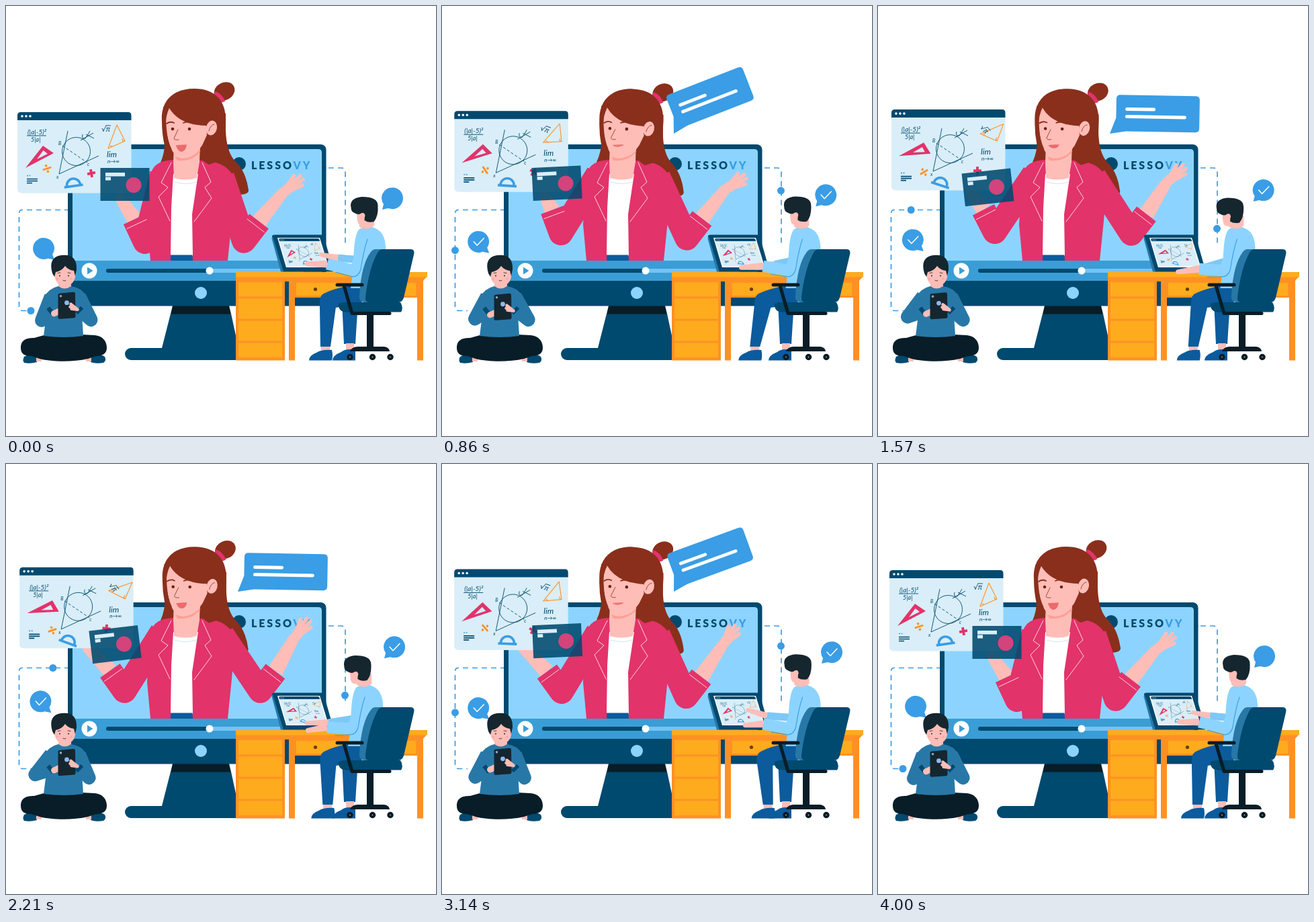
Animation, 640 px wide and 640 px high, one loop 4070 ms. Source, as an HTML page:

```html
<!DOCTYPE html>
<html lang="en">
<head>
<meta charset="utf-8">
<title>Online lesson</title>
<style>
  html, body { margin: 0; width: 100%; height: 100%; overflow: hidden; background: #fff; }
  svg { display: block; width: 100vw; height: 100vh; }
  .navy { fill: #00496f; } .ink { fill: #081d27; } .hair { fill: #8a2f1c; } .boyhair { fill: #15262f; }
  .skin { fill: #ffbdb7; } .pink { fill: #e2336a; } .sky { fill: #8cd4ff; } .blue { fill: #3a9de5; }
  .jeans { fill: #0b5b9d; } .teal { fill: #2878a7; } .amber { fill: #ffab1e; } .orange { fill: #ff9124; }
  .white { fill: #fff; }
  .line { fill: none; stroke-linecap: round; stroke-linejoin: round; }
  .flat { fill: none; stroke-linejoin: round; }
  .thin { fill: none; stroke: #00496f; stroke-width: .9; }
  text { font-family: Lato, sans-serif; fill: #00496f; }
  .note { font-style: italic; }
</style>
</head>
<body>
<svg viewBox="0 0 640 640">
  <g class="flat" stroke="#3a9de5" stroke-width="1.7" stroke-dasharray="8 6">
    <path d="M95 303.500H24Q19.500 303.500 19.500 309V448Q19.500 453.500 25 453.500H38"/>
    <path d="M480 241H499Q505 241 505 247V358"/>
  </g>
  <circle id="dotL" r="5.500" class="blue"/>
  <circle id="dotR" r="5.500" class="blue"/>

  <!-- monitor -->
  <path class="navy" d="M245 458H335L346 509V527H186A9 9 0 0 1 186 509H232Z"/>
  <path class="ink" d="M248 446H332L335 458.500H245Z"/>
  <rect class="navy" x="92" y="206" width="384.500" height="240.500" rx="8"/>
  <path class="sky" d="M99 379V218Q99 213 104 213H465Q470 213 470 218V379Z"/>
  <path fill="#3b9dd5" d="M99 379H470V409H99Z"/>
  <circle class="sky" cx="290" cy="427" r="9"/>
  <circle class="white" cx="124" cy="394" r="11.500"/>
  <path fill="#3b9dd5" d="M121 388.500V399.500L129.500 394Z"/>
  <path class="line" stroke="#74c3f5" stroke-width="6" d="M303 394H440"/>
  <path class="line" stroke="#00496f" stroke-width="6" d="M152 394H303"/>
  <circle class="white" cx="303" cy="394" r="5.500"/>
  <circle class="navy" cx="347" cy="235" r="10"/>
  <text x="365" y="242.500" font-size="16" font-weight="900" letter-spacing="2.900">LESSO<tspan fill="#3a9de5">VY</tspan></text>

  <!-- teacher -->
  <g id="hairBack"><path class="hair" d="M234 150L236 190Q238 215 230 233L250 260L330 262L348 281Q362 280 361 274Q357 246 342 232Q328 218 327 185V160Z"/></g>
  <path id="foreL" class="skin"/>
  <path id="foreR" class="skin"/>
  <g id="handR">
    <ellipse class="skin" cx="9" cy="0" rx="13" ry="8"/>
    <path class="line" stroke="#ffbdb7" stroke-width="5.500" d="M10 -4L29 -10M12 -2L36 -4M12 1L36 3M10 4L30 9"/>
  </g>
  <path id="sleeveL" class="flat" stroke="#e2336a" stroke-width="36"/>
  <path id="sleeveR" class="flat" stroke="#e2336a" stroke-width="36"/>
  <path id="cuffL" class="line" stroke="#ffd5dc"/>
  <path id="cuffR" class="line" stroke="#ffd5dc"/>
  <path class="pink" d="M250 229C226 230 217 238 214 256L210 325L215 379H330L336 320L341 258C331 238 318 231 288 230Z"/>
  <path class="white" d="M249 250H286L277 310L278 372H245L246 300Z"/>
  <path class="jeans" d="M245 370.500H277.500L278 379H245Z"/>
  <path class="skin" d="M250 205L289 200L288 232L284 256Q268 261 250 256L249 232Z"/>
  <path fill="none" stroke="#cfe3ee" d="M251 262Q268 267 283 262"/>
  <path class="line" stroke="#ffd5dc" d="M246 233L231 263L241 270L227 284L244 320M292 233L305 262L296 270L306 286L280 321"/>
  <path fill="#ff9f97" d="M252 224Q272 233 289 212V217Q277 232 255 230Z"/>
  <g id="head">
    <ellipse class="hair" cx="325" cy="127" rx="16" ry="13" transform="rotate(-28 325 127)"/>
    <path class="flat" stroke="#e2336a" stroke-width="7" d="M310 130Q319 133 323 143"/>
    <path class="skin" d="M238 150Q237 195 246 213Q254 229 268 226Q284 223 290 210L302 195V160L262 140Z"/>
    <path class="hair" d="M232 172C230 140 250 123 280 123C312 123 328 142 327 172V200Q326 215 332 226L302 236Q287 229 290 212L299 192L298 178Q258 177 243 152Q237 165 238 180Q240 200 247 214L236 208Q232 190 232 172Z"/>
    <ellipse class="skin" cx="306" cy="181.500" rx="8" ry="11" transform="rotate(12 306 181)"/>
    <path class="line" stroke="#8a2f1c" stroke-width=".8" d="M302 186Q304 177 310 176M256 184L250 197Q251 200 257 199"/>
    <path class="line" stroke="#8a2f1c" stroke-width="1.800" d="M239 175Q245 171 250 174M264 174Q271 171 279 175"/>
    <path class="line" stroke="#6b2216" stroke-width="4.600" d="M248 183h0M273 183h0"/>
    <path class="line" stroke="#ec6a6c" stroke-width="1.400" d="M254 208Q261 211 268 207"/>
    <path id="mouth" fill="#ec6a6c"/>
  </g>

  <!-- whiteboard window -->
  <g id="window"><g id="board">
    <path fill="#d9eef8" d="M17 168H186.500V272Q186.500 278.500 180 278.500H24Q17 278.500 17 272Z"/>
    <path class="navy" d="M17 170V163Q17 158 22 158H182Q186.500 158 186.500 163V170Z"/>
    <path class="line" stroke="#fff" stroke-width="3.600" d="M24 164h0M30 164h0M36 164h0"/>
    <text class="note" x="32" y="191" font-size="10">(|a|-5)²</text>
    <path class="thin" d="M31 193H60"/>
    <text class="note" x="37" y="202" font-size="9">5|a|</text>
    <text class="note" x="150" y="225" font-size="12">lim</text>
    <text class="note" x="151" y="233.500" font-size="8">n→∞</text>
    <circle class="thin" cx="104.500" cy="216.500" r="21"/>
    <path class="thin" d="M92 186L79 250L138 223M111 200L130 189M114 191Q112 198 118 197Q123 190 125 186M119 191L131 197"/>
    <path class="thin" stroke-dasharray="4 3" d="M84 208L121 233"/>
    <text class="note" x="78" y="207" font-size="7">B</text><text class="note" x="75" y="257" font-size="7">x</text><text class="note" x="121" y="238" font-size="7">c</text>
    <path stroke="#3a9de5" stroke-width="1.600" d="M31 252.500h2m1.500 0h2"/>
    <path stroke="#00496f" stroke-width="1.700" d="M31 257.500H47M31 260.500H47M31 263.500H39"/>
    <g id="square"><path class="pink" fill-rule="evenodd" d="M-22 18L4 -15L20 -4ZM-5 5L11 -3L4.500 -8Z"/></g>
    <g id="outline"><path class="line" stroke="#ff9124" stroke-width="1.100" d="M0 -20L-13 15L12 4ZM12 4h-3l-1 -3M-10 11l3 1"/></g>
    <g id="divide"><path class="flat" stroke="#ff9124" stroke-width="2.800" d="M-6.500 0H6.500"/><circle class="orange" cy="-4.500" r="1.800"/><circle class="orange" cy="4.500" r="1.800"/></g>
    <g id="cross"><path stroke="#e2336a" stroke-width="3.800" d="M-6 0H6M0 -6V6"/></g>
    <g id="root"><text class="note" x="-7" y="4" font-size="11">√π</text><path class="thin" d="M0 -5H7"/></g>
    <g id="protractor"><path fill="none" stroke="#3a9de5" stroke-width="3.600" d="M-10 4A10 10 0 0 1 10 4M-14 5H14"/></g>
  </g></g>

  <g id="card">
    <rect class="navy" x="-36.500" y="-24.500" width="73" height="49" opacity=".88"/>
    <path fill="#d9eef8" d="M-29 -17.500H0V-12H-29ZM-29 -11H-21V-6H-29Z"/>
    <circle cx="13" cy="1" r="11.500" fill="#d2447b"/>
  </g>

  <g id="message">
    <path class="blue" d="M15 -58H127Q133 -58 133 -52V-10Q133 -4 127 -4H24L0 0L9 -24V-52Q9 -58 15 -58Z"/>
    <path class="line" stroke="#fff" stroke-width="5" d="M25 -37H65M25 -26H111"/>
  </g>

  <!-- desk and laptop -->
  <path class="orange" d="M342 402H415V527.500H342ZM421 402H430V527.500H421ZM612 402H621V527.500H612ZM430 406H612V434H430ZM342 396H627V402L620 410H342Z"/>
  <path class="amber" d="M342 396H627V403.500H342ZM346 411H411V432.500H346ZM346 435.500H411V465.500H346ZM346 468.500H411V498.500H346ZM346 501.500H411V523H346ZM432 412H610V431H432Z"/>
  <circle cx="460.500" cy="421.500" r="2.600" fill="#6b3c10"/>
  <path class="navy" d="M400 340.500H469Q472 340.500 473 343L488 395.500H412L396 344Q395 340.500 400 340.500Z"/>
  <path class="teal" d="M397 343L413 395.500H409L395.500 346Z"/>
  <path class="white" d="M404 345H467L480.500 389H417Z"/>
  <use href="#board" transform="matrix(.355 0 .1 .34 384 292.300)"/>

  <!-- student at the desk -->
  <path class="jeans" d="M500 440H524L520 503H503Z"/>
  <path class="skin" d="M506 502H518V514H506Z"/>
  <path class="jeans" d="M486 527.500Q486 520 499 515Q505 510 520 511V527.500Z"/>
  <g id="foot"><path class="skin" d="M-6 -3H7V9H-6Z"/><path class="jeans" d="M-24 21.500Q-24 14 -12 9.500Q-5 5 10 6Q12 14 10 21.500Z"/></g>
  <path id="leg" class="jeans"/>
  <path id="farSleeve" class="flat" stroke="#7cc8f6" stroke-width="11"/>
  <path id="farHand" class="skin"/>
  <g id="torso">
    <path class="sky" d="M526 332Q540 325 550 331Q566 338 565 365L560 420H513L517 390Q517 340 526 332Z"/>
    <path class="skin" d="M524 312H548V327Q538 335 526 329Z"/>
  </g>
  <g id="studentHead">
    <path class="skin" d="M522 303H548V320Q530 330 524 324Q521 318 522 303Z"/>
    <path class="boyhair" d="M513 300Q510 286 529 284Q553 284 553 297Q554 313 547 321Q538 323 533 319Q534 309 529 308Q525 312 518 308Q513 306 513 300Z"/>
    <path class="skin" d="M526 310Q533 305 534 312Q533 318 528 317Z"/>
  </g>
  <path id="nearHand" class="skin"/>
  <path id="nearSleeve" class="flat" stroke="#8cd4ff" stroke-width="17"/>
  <path id="fold" class="line" stroke="#3a9de5" stroke-width="1.100"/>

  <!-- chair -->
  <path class="teal" d="M550 362H566L540 441Q524 443 526 430Q529 384 543 366Q546 362 550 362Z"/>
  <path class="navy" d="M561 362H602Q609 362 607 370L592 434Q590 441 584 441H541Q534 441 535 433Q540 391 553 367Q556 362 561 362ZM502 441H587Q592 449 588 455.500H506Q494 455 495 443Z"/>
  <path class="line" stroke="#081d27" stroke-width="5" d="M493 415H530M503 416L515 457.500H571"/>
  <path class="ink" d="M537 460H547V509H537ZM512 514Q515 507 524 507H563Q570 508 571 514Z"/>
  <path class="line" stroke="#081d27" stroke-width="9.500" d="M512 522.500h0M545.500 522.500h0M572 522.500h0"/>
  <path class="line" stroke="#fff" stroke-width="1.400" d="M512 522.500h0M545.500 522.500h0M572 522.500h0"/>

  <!-- cross-legged boy -->
  <g id="chatL"><path class="blue" d="M16 0A16 16 0 1 0 6 15L16 17L13 9A16 16 0 0 0 16 0Z"/><path class="check line" pathLength="1" stroke="#fff" stroke-width="1.500" d="M-7 0L-2 5.500L8 -5"/></g>
  <g id="chatR"><path class="blue" d="M-16 0A16 16 0 1 1 -6 15L-15 17L-13 9A16 16 0 0 1 -16 0Z"/><path class="check line" pathLength="1" stroke="#fff" stroke-width="1.500" d="M-7 0L-2 5.500L8 -5"/></g>
  <path class="navy" d="M27 522Q34 517 46 520V530Q36 533 27 531Q24 527 27 522ZM126 520Q140 516 147 522Q150 528 145 531Q133 533 126 530Z"/>
  <path class="skin" d="M45 519H53V529H45ZM119 519H127V529H119Z"/>
  <path class="ink" d="M22 509C22 497 30 494 42 494L60 489H112L132 490C144 491 150 499 150 509C150 518 142 521 134 521L122 525C100 530 70 530 50 525L38 521C28 521 22 518 22 509Z"/>
  <path class="skin" d="M78 405H97V425H78Z"/>
  <path id="boyArms" class="flat" stroke="#2878a7" stroke-width="20"/>
  <path class="teal" d="M78 417Q87 424 97 417Q112 419 119 431L113 460L115 491Q87 495 56 491L60 460L56 434Q64 420 78 417Z"/>
  <path class="skin" d="M71 388H103Q107 416 87 417Q70 416 71 388Z"/>
  <path class="boyhair" d="M69 398Q62 374 82 371Q106 368 105 392L103 402L101 394Q93 393 88 387Q82 395 74 396L72 403Z"/>
  <path class="line" stroke="#15262f" stroke-width=".8" d="M77 397.500l4 -.5M92 397l4 .5M85 408.500Q87 410 89 408.500"/>
  <path class="line" stroke="#15262f" stroke-width="1.900" d="M80 401.500h0M93 401.500h0"/>
  <path class="line" stroke="#fda9a4" stroke-width="3.500" d="M76 406h0M97 406h0"/>
  <path id="boyCuffs" class="flat" stroke="#00496f" stroke-width="12"/>
  <g id="tablet">
    <path class="line" stroke="#ffbdb7" stroke-width="9" d="M-19 12L-10 8"/>
    <path class="boyhair" d="M-11 -18L10 -20Q12 -20 12.500 -18L13 16Q13 18 11 18.500L-10 20Q-13 20 -13 18V-16Q-13 -18 -11 -18Z"/>
    <circle cx="-9" cy="-14" r="1.800" fill="#8fa6b8"/><circle cy="-4" r="3.400" fill="#91b8ee"/>
    <path class="line" stroke="#ffbdb7" stroke-width="4.500" d="M16 6L6 -2M16 6L5 2M16 6L7 5"/>
  </g>
</svg>
<script>
const LOOP = 4070, STEPS = 57, TAU = 2 * Math.PI;
const $ = id => document.getElementById(id);
const clamp = v => Math.max(0, Math.min(1, v));
const smooth = v => clamp(v) ** 2 * (3 - 2 * clamp(v));

// there: 0 to 1 and back; turn: angle of the slow circular drift.
let there = 0, turn = 0;
const go = (a, b) => a + (b - a) * (1 - Math.cos(Math.PI * there)) / 2;
const drift = (centre, a, b) => centre + a * Math.cos(turn) + b * Math.sin(turn);
const bob = () => Math.sin(TAU * there);

const draw = (id, d) => $(id).setAttribute('d', d);
const poly = points => 'M' + points.join('L');

function place(id, x, y, angle = 0, scale = 1) {
  $(id).setAttribute('transform', `translate(${x} ${y}) rotate(${angle}) scale(${scale})`);
}

// Angles are clockwise from straight up.
function reach([x, y], angle, length) {
  const a = angle * Math.PI / 180;
  return [x + length * Math.sin(a), y - length * Math.cos(a)];
}

function across([ax, ay], [bx, by], half) {
  const len = Math.hypot(bx - ax, by - ay) || 1;
  return [(ay - by) / len * half, (bx - ax) / len * half];
}

function taper(a, b, start, end) {
  const [sx, sy] = across(a, b, start), [ex, ey] = across(a, b, end);
  return `M${a[0] + sx} ${a[1] + sy}L${b[0] + ex} ${b[1] + ey}A${end} ${end} 0 0 0 ${b[0] - ex} ${b[1] - ey}L${a[0] - sx} ${a[1] - sy}Z`;
}

function arm(side, shoulder, upper, length, fore, wristAngle, wristLength) {
  const elbow = reach(shoulder, upper, length), cuff = reach(elbow, fore, 37);
  const wrist = reach(cuff, wristAngle, wristLength);
  const seam = reach(elbow, fore, 29), [dx, dy] = across(elbow, cuff, 16);
  draw('sleeve' + side, poly([shoulder, elbow, cuff]));
  draw('fore' + side, taper(cuff, wrist, 12, 8));
  draw('cuff' + side, poly([[seam[0] - dx, seam[1] - dy], [seam[0] + dx, seam[1] + dy]]));
  return wrist;
}

function teacher() {
  const tilt = `rotate(${2 * Math.sin(Math.PI * there)} 270 238)`;
  for (const id of ['head', 'hairBack']) $(id).setAttribute('transform', tilt);
  const lip = 208 + 9 * clamp(.2 + .8 * Math.cos(TAU * there));
  draw('mouth', `M253 207.500Q261 206 269 206.500Q267 ${lip} 261 ${lip}Q256 ${lip} 253 207.500Z`);

  const fore = drift(-29, 4, 8);
  arm('L', [232, 250], 194 + 21 * Math.sin(.75 * Math.PI * there), 104, fore, fore - 9, drift(40, -2, -17));
  const wrist = arm('R', [322, 254], go(161.5, 145.5), 101, 37.5, drift(35, 5, 2.5), 55);
  place('handR', ...wrist, drift(-43, 5, 10));
}

function board() {
  place('window', go(0, 3.3), go(0, -4.3));
  place('square', go(51, 56), go(223, 219), go(0, 26));
  place('outline', go(165, 169.5), go(197, 193), go(0, 52));
  place('divide', go(61, 66), go(242, 252), go(-18, 168));
  place('cross', go(127, 147), 249, go(-10, 100));
  place('root', go(149, 157), go(183, 188), go(0, 55));
  place('protractor', go(100, 90), go(263, 266), go(-8, 21));
  place('card', go(177, 162), 265.5 - 4.5 * bob(), go(0, -7));
}

function student() {
  const lean = go(0, -4), ankle = drift(475, 0, -10), knee = 467 + (ankle - 476) * .15;
  const nearWrist = [478, go(384, 392)], nearTip = [drift(448.5, 0, -3), go(384, 397)];
  const farWrist = [drift(488, 6, 6), drift(381, -6, 5)], farTip = [drift(459, 10, 6), drift(380, -10, 12)];
  place('torso', lean, 0);
  place('studentHead', go(.5, -10), -1.5 * bob());
  place('foot', ankle, 506);
  draw('leg', `M527 415Q495 417 ${knee + 6} 428Q${knee} 431 ${knee} 441L${ankle - 7} 507H${ankle + 8}L${knee + 24} 449L530 443Z`);
  draw('farSleeve', poly([[528 + lean, 378], farWrist]));
  draw('farHand', taper(farWrist, farTip, 5, 3));
  draw('nearHand', taper(nearWrist, nearTip, 5.5, 3.5));
  draw('nearSleeve', poly([[536 + lean, 345], [520 + lean, 394], nearWrist]));
  draw('fold', `M${538 + lean} 347Q${532 + lean} 365 ${528 + lean} 392Q${525 + lean} 403 ${515 + lean} 403L${nearWrist[0] + 12} ${nearWrist[1] + 12}`);
}

function boy() {
  const left = [go(53, 43), go(468, 462)], right = [drift(125.5, 1, 3), 467];
  draw('boyArms', poly([[67, 432], left, [66, 455]]) + poly([[109, 432], right, [109, 452]]));
  draw('boyCuffs', poly([[64, 456], [69, 452]]) + poly([[111, 455], [107, 451]]));
  place('tablet', 90.5, drift(445.2, .5, 2.5));
}

function bubbles() {
  place('chatL', drift(53.7, 2.4, 0), drift(355.8, 5, -6.3));
  place('chatR', drift(575.8, -.8, -4.5), drift(279, 7, .6));
  const drawn = clamp((there - .11) / .29);
  for (const mark of document.querySelectorAll('.check')) {
    mark.style.visibility = drawn ? 'visible' : 'hidden';
    mark.setAttribute('stroke-dasharray', `${drawn} 2`);
  }
  const angle = 25 * smooth((there - .6) / .2) - 24 * smooth(there / .55);
  place('message', 345, 190, angle, 1 - (1 - clamp(there / .5)) ** 2);

  const left = there * 248, right = there * 156;
  place('dotL', 37 - Math.min(17.5, left) + Math.max(0, left - 168), 453.5 - 150 * clamp((left - 18) / 150));
  place('dotR', 471 + Math.min(33.5, right), 241 + Math.max(0, right - 34));
}

function frame(ms) {
  const step = Math.min(STEPS - 1, Math.floor((ms % LOOP + 5) / (LOOP / STEPS)));
  there = Math.max(0, Math.min(step, 55.3 - step)) / 27.6;
  turn = TAU * step / (STEPS - 1);
  teacher();
  board();
  student();
  boy();
  bubbles();
}

function tick() {
  frame(performance.now());
  requestAnimationFrame(tick);
}
tick();
</script>
</body>
</html>
```
